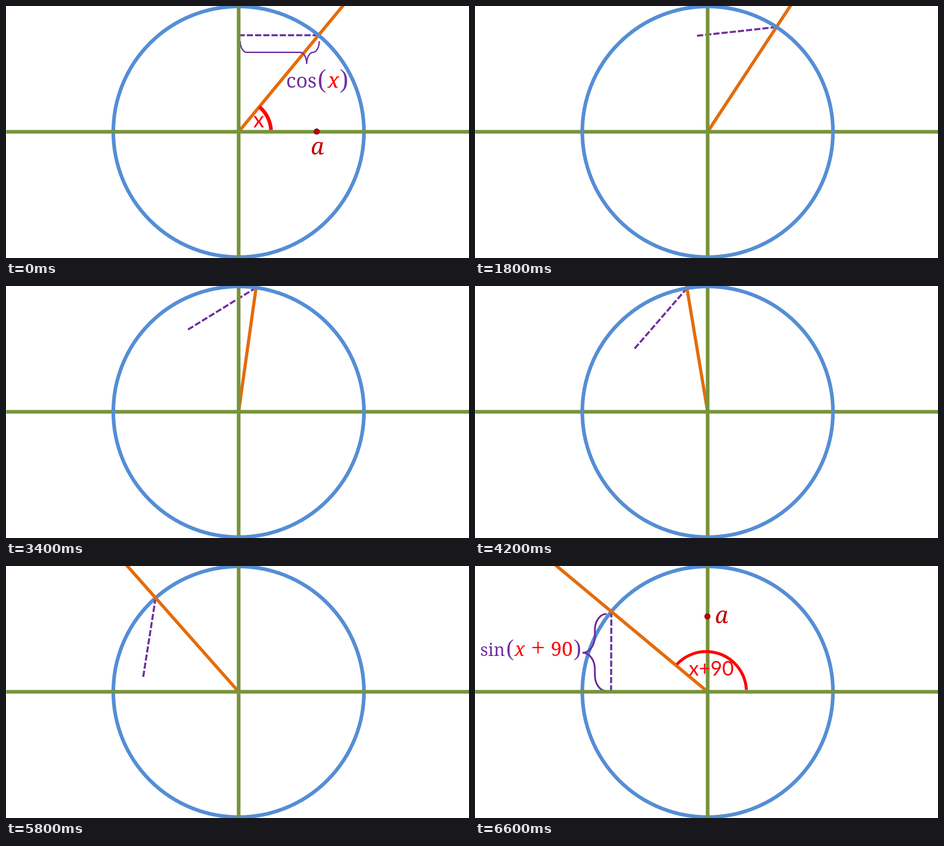
These frames come from a looping animation (1014x552 px, 8000 ms). An HTML page with a canvas:

```html
<!DOCTYPE html>
<html lang="en">
<head>
<meta charset="utf-8">
<title>cos(x) = sin(x + 90)</title>
<style>
html, body { margin: 0; width: 100%; height: 100%; overflow: hidden; background: #fff; }
canvas { display: block; }
</style>
</head>
<body>
<canvas id="stage" width="1014" height="552"></canvas>
<script>
const ctx = document.getElementById('stage').getContext('2d');
const W = 1014, H = 552, CX = 509.5, CY = 275.5, R = 274.5;
const LOOP = 8000, HOLD = 1400, STEP = 400;
const GREEN = '#77933c', BLUE = '#558ed5', ORANGE = '#e46c0a';
const PURPLE = '#7030a0', RED = '#ff0000', DARK = '#c00000';
const SERIF = '"Noto Serif", serif', THIN = '"Liberation Serif", serif', SANS = 'Lato, sans-serif';

// Angle of the ray in degrees at each step of the turn
const angles = [50.4, 56.7, 60.9, 66.8, 73.3, 82, 91, 99.5, 112, 119.5, 126, 131.5, 140.2];
const rad = deg => deg * Math.PI / 180;

function stroke(color, width, path) {
  ctx.strokeStyle = color;
  ctx.lineWidth = width;
  ctx.beginPath();
  path();
  ctx.stroke();
}

function line(x1, y1, x2, y2, color, width) {
  stroke(color, width, () => {
    ctx.moveTo(x1, y1);
    ctx.lineTo(x2, y2);
  });
}

function text(str, x, y, size, color, family, style = '') {
  ctx.font = `${style} ${size}px ${family}`;
  ctx.fillStyle = color;
  ctx.fillText(str, x, y);
}

function dot(x, y) {
  ctx.fillStyle = DARK;
  ctx.beginPath();
  ctx.arc(x, y, 5.8, 0, 2 * Math.PI);
  ctx.fill();
  stroke('#8c0000', 1.8, () => ctx.arc(x, y, 5.8, 0, 2 * Math.PI));
}

const circle = () => stroke(BLUE, 8, () => ctx.arc(CX, CY, R, 0, 2 * Math.PI));

function axes() {
  line(0.5, CY, W, CY, GREEN, 8);
  line(CX, 0, CX, H, GREEN, 8);
}

function ray(deg) {
  const a = rad(deg);
  line(CX, CY, CX + 480 * Math.cos(a), CY - 480 * Math.sin(a), ORANGE, 7);
}

// Dashed segment fixed to the ray, turning with it
function dashes(deg) {
  const a = rad(deg), turn = rad(deg - angles[0]), len = 175;
  const x = CX + R * Math.cos(a), y = CY - R * Math.sin(a);
  ctx.setLineDash([13.5, 4.5]);
  line(x - len * Math.cos(turn), y + len * Math.sin(turn), x, y, PURPLE, 4.5);
  ctx.setLineDash([]);
}

const K = 0.5523;

// Quarter ellipse; "across" leaves the start point horizontally
function quarter(x1, y1, x2, y2, across) {
  const dx = (x2 - x1) * K, dy = (y2 - y1) * K;
  if (across) ctx.bezierCurveTo(x1 + dx, y1, x2, y2 - dy, x2, y2);
  else ctx.bezierCurveTo(x1, y1 + dy, x2 - dx, y2, x2, y2);
}

function cosBrace() {
  stroke(PURPLE, 3, () => {
    ctx.moveTo(513, 77);
    quarter(513, 77, 527, 101.5, false);
    ctx.lineTo(644.5, 101.5);
    quarter(644.5, 101.5, 658.5, 127, true);
    quarter(658.5, 127, 672.5, 101.5, false);
    quarter(672.5, 101.5, 686, 77, true);
  });
}

function sinBrace() {
  stroke(PURPLE, 4, () => {
    ctx.moveTo(288, 105);
    quarter(288, 105, 262.5, 140, true);
    ctx.lineTo(262.5, 154);
    quarter(262.5, 154, 235.5, 190, false);
    quarter(235.5, 190, 262.5, 226, true);
    ctx.lineTo(262.5, 239);
    quarter(262.5, 239, 288, 274, false);
  });
}

function cosLabels() {
  stroke(RED, 8, () => ctx.arc(CX, CY, 71, rad(-3.3), rad(-50.4), true));
  text('x', 553.5, 266, 48, RED, SANS);
  text('cos', 647, 178.5, 44, PURPLE, SERIF);
  text('(', 692, 178, 56, PURPLE, THIN);
  text('x', 717, 178.5, 46, RED, SERIF, 'italic');
  text(')', 740, 178, 56, PURPLE, THIN);
  dot(680.5, 275);
  text('a', 682, 325, 50, DARK, SERIF, 'italic');
}

function sinLabels() {
  stroke(RED, 6.5, () => ctx.arc(506.5, CY, 88, rad(-2.8), rad(-137), true));
  text('x+90', 517.5, 240, 44, RED, SANS);
  text('sin', 38.5, 197, 38, PURPLE, SERIF);
  text('(', 77, 196, 50, PURPLE, THIN);
  text('x', 98, 197, 42, RED, SERIF, 'italic');
  text('+', 138, 197, 54, RED, THIN);
  text('90', 190, 197, 43, RED, SERIF);
  text(')', 224, 196, 50, PURPLE, THIN);
  dot(509, 110.5);
  text('a', 540, 124.5, 50, DARK, SERIF, 'italic');
}

function draw(t) {
  const opening = t < HOLD, closing = t >= 6600;
  const step = opening ? 0 : Math.min(angles.length - 1, Math.floor((t - HOLD) / STEP));
  const deg = angles[step], late = t >= 5800;

  ctx.fillStyle = '#fff';
  ctx.fillRect(0, 0, W, H);
  ctx.textAlign = 'center';

  if (late) circle();
  dashes(deg);
  ray(deg);
  if (opening) {
    circle();
    cosBrace();
  }
  if (closing) sinBrace();
  axes();
  if (!opening && !late) circle();
  if (opening) cosLabels();
  if (closing) sinLabels();
}

const start = performance.now();
function tick() {
  draw((performance.now() - start) % LOOP);
  requestAnimationFrame(tick);
}
tick();
</script>
</body>
</html>
```
